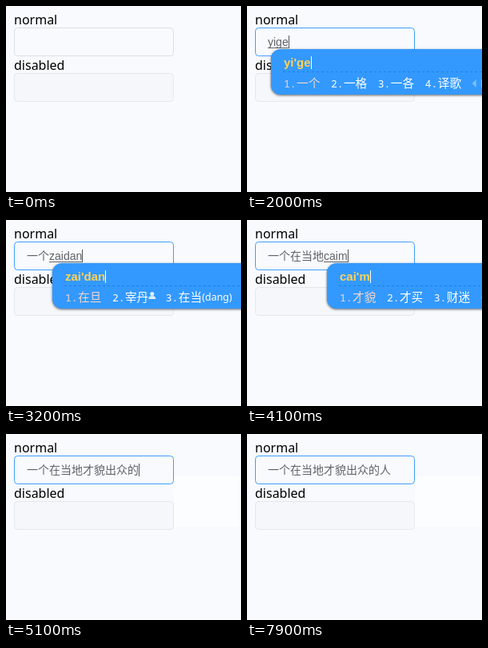
Recreate the animation shown at these times as an HTML page. Size 294 px wide and 233 px high, loop 8100 ms.

```html
<!DOCTYPE html>
<html lang="zh">
<head>
<meta charset="utf-8">
<style>
html, body { margin: 0; width: 100%; height: 100%; overflow: hidden; background: #f8fafd; }
svg { display: block; }
.label { font: 16px "Noto Sans", "Open Sans", sans-serif; fill: #000; }
.value { font: 14px "Liberation Sans", "Noto Sans CJK SC", sans-serif; fill: #606266; }
.pinyin { font: bold 15px "Liberation Sans", sans-serif; fill: #ffd257; }
.num { font: 13px "Noto Sans Mono", monospace; }
.cand { font: 300 14.7px "Noto Sans CJK SC", sans-serif; }
.hint { font: 12.5px "Noto Sans", sans-serif; }
</style>
</head>
<body>
<svg id="stage" width="294" height="233" viewBox="0 0 294 233"></svg>
<script>
const LOOP = 8100;
const stage = document.getElementById('stage');
const pen = document.createElement('canvas').getContext('2d');

// time, committed text, pinyin being typed, candidates (* = contact icon)
const steps = [
  [0, ''],
  [1100, '', 'y', '一 有 也 用 ①'],
  [1200, '', 'yi', '一 以 已 亿 ①'],
  [1500, '', "yi'g", '一个 一共 一过 一股'],
  [1800, '', "yi'ge", '一个 一格 一各 译歌'],
  [2300, '一个'],
  [2700, '一个', 'z', '在 这 中 做 ①'],
  [2800, '一个', 'za', '咋 杂 砸 扎 匝'],
  [2900, '一个', 'zai', '在 再 载 灾 仔'],
  [3000, '一个', "zai'd", '在的 在等 在读 再度'],
  [3100, '一个', "zai'da", '在大 在打 再打 再大'],
  [3200, '一个', "zai'dan", '在旦 宰丹* 在当(dang)'],
  [3400, '一个', "zai'dang", '在当 再当 在党 在档'],
  [3500, '一个', "zai'dang'di", '在当地 再当地 在当'],
  [3600, '一个在当地'],
  [3700, '一个在当地', 'c', '从 才 出 错 ①'],
  [3900, '一个在当地', 'cai', '才 菜 猜 财 采'],
  [4100, '一个在当地', "cai'm", '才貌 才买 财迷'],
  [4300, '一个在当地才貌'],
  [4400, '一个在当地才貌', 'c', '从 才 出 错 ①'],
  [4600, '一个在当地才貌', 'chu', '出 处 初 除 楚'],
  [4700, '一个在当地才貌', "chu'z", '出众 出租 处在'],
  [4900, '一个在当地才貌', "chu'z'd", '出众的 出租的 初中的'],
  [5000, '一个在当地才貌出众的'],
  [5300, '一个在当地才貌出众的', 'r', '人 让 如 然 日'],
  [5400, '一个在当地才貌出众的人']
];
const caretFlips = [200, 800, 1100, 6000, 6500, 7000, 7400, 7900];

const text = (x, y, cls, s, more = '') => `<text class="${cls}" x="${x}" y="${y}" ${more}>${s}</text>`;
const rect = (x, y, w, h, fill, more = '') =>
  `<rect x="${x}" y="${y}" width="${w}" height="${h}" fill="${fill}" ${more}/>`;
const field = (y, fill, stroke) => rect(10.5, y + .5, 199, 35, fill, `rx="4" stroke="${stroke}"`);

function width(s, font) {
  pen.font = font;
  return pen.measureText(s).width;
}

function mix(a, b, k) {
  return `rgb(${a.map((v, i) => Math.round(v + (b[i] - v) * k))})`;
}

function candidates(x, list) {
  let out = '';
  list.split(' ').forEach((item, i) => {
    const [, word, star, hint] = item.match(/^([^*(]+)(\*?)(.*)$/);
    const fill = `fill="${i ? '#fff' : '#f0d6cc'}"`;
    const end = x + 16 + 14.7 * word.length;
    out += text(x, 102, 'num', i + 1 + '.', fill) + text(x + 16, 102, 'cand', word, fill);
    if (hint) out += text(end, 101, 'hint', hint, fill);
    if (star) out += `<path transform="translate(${end} 90)" fill="#d9f0ff"
      d="M4.5 0a2.5 2.5 0 0 1 0 5a2.5 2.5 0 0 1 0-5M0 9q0-4 4.5-4t4.5 4z"/>`;
    x = end + 13.5 + (star ? 8 : 0) + (hint ? 38 : 0);
  });
  return out + `<path d="M${x + 5} 92v10l-5-5z" fill="#7fbfff"/>
    <path d="M${x + 12} 92v10l6-5z" fill="#fff"/>
    <rect x="${x + 24.5}" y="90.5" width="12" height="13" fill="none" stroke="#a6d2ff"/>`;
}

function popup(left, pinyin, list) {
  const x = left + 16;
  const caret = Math.round(x + width(pinyin, 'bold 15px "Liberation Sans", sans-serif'));
  return rect(left, 54, 340, 57, '#39f', 'rx="12" style="filter:drop-shadow(0 1px 1.5px #0009)"') +
    text(x, 76, 'pinyin', pinyin) + rect(caret, 63, 1, 16, '#fff') +
    `<path d="M${x - 1} 82.5H294" stroke="#1c7fe0" stroke-dasharray="3 3"/>` +
    candidates(x, list);
}

function draw(t) {
  const [, done, pinyin, list] = steps.filter(s => s[0] <= t).pop();
  const focus = Math.max(0, Math.min(1, (Math.floor(t / 100) - 1) / 4));
  const start = 26 + 14 * done.length;
  const typed = (pinyin || '').replaceAll("'", '');
  const end = Math.round(start + width(typed, '14px "Liberation Sans", sans-serif'));

  let out = rect(0, 0, 294, 233, '#f8fafd');
  if (t >= 2300 && !pinyin) out += rect(210, 53, 82, 63, '#fcfdfe');
  out += text(10, 23, 'label', 'normal') + text(10, 80, 'label', 'disabled') +
    field(27, '#f8fafd', mix([220, 223, 230], [64, 158, 255], focus)) +
    field(84, '#f5f7fb', '#e4e7ed') +
    text(26, 50, 'value', done) + text(start, 50, 'value', typed);
  if (typed) out += rect(start, 52, end - start, 1, '#606266');
  if (caretFlips.filter(c => c <= t).length % 2) out += rect(end, 37, 1, 16, '#505256');
  if (pinyin) out += popup(start + 4, pinyin, list);
  return out;
}

let shown;
function tick() {
  const svg = draw(performance.now() % LOOP);
  if (svg !== shown) stage.innerHTML = shown = svg;
  requestAnimationFrame(tick);
}
tick();
</script>
</body>
</html>
```
